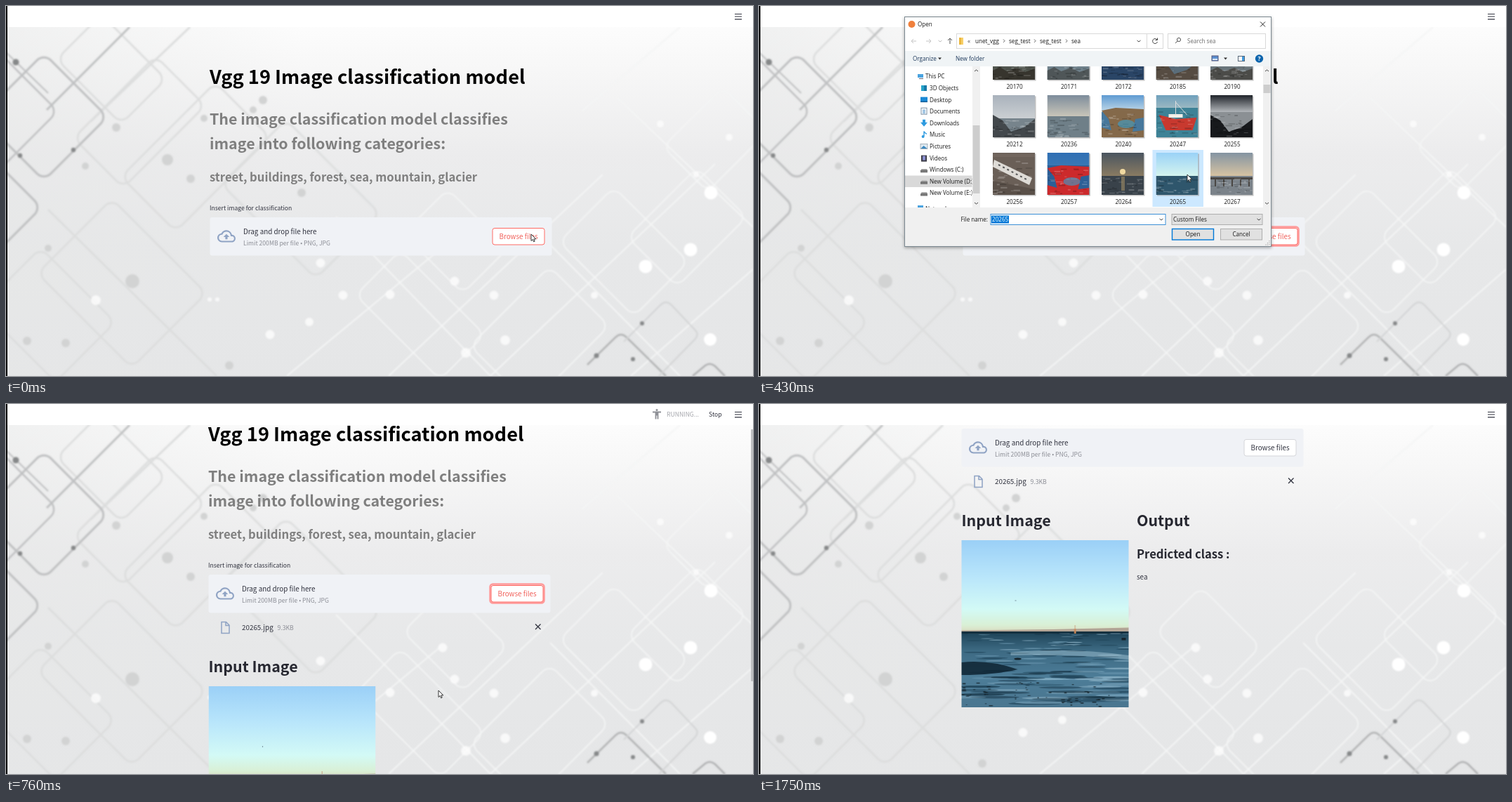
Write an HTML page that moves like this. It is 1064 px wide and 527 px high and loops after 2.15 s.

```html
<!DOCTYPE html>
<html lang="en">
<head>
<meta charset="utf-8">
<title>Image classification demo</title>
<style>
html, body { margin: 0; width: 100%; height: 100%; overflow: hidden; background: #fff; }
svg { display: block; width: 1064px; height: 527px; }
.page { font-family: "Noto Sans CJK JP", "Noto Sans CJK SC", "Noto Sans CJK", "Open Sans", sans-serif; }
.ui { font-family: "Open Sans", "Noto Sans", sans-serif; }
text { white-space: pre; }
</style>
</head>
<body>
<svg id="stage" viewBox="0 0 1064 527" xmlns="http://www.w3.org/2000/svg"></svg>
<script>
const LOOP = 2150;
const INK = '#31333f';

let seed = 7;
const rnd = (a = 0, b = 1) => {
  seed = (seed * 16807) % 2147483647;
  return +(a + (b - a) * seed / 2147483647).toFixed(2);
};
const times = (n, fn) => Array.from({ length: n }, (_, i) => fn(i)).join('');

const rect = (x, y, w, h, fill, extra = '') =>
  `<rect x="${x}" y="${y}" width="${w}" height="${h}" fill="${fill}" ${extra}/>`;
const path = (d, stroke, w = 1, extra = '') =>
  `<path d="${d}" fill="none" stroke="${stroke}" stroke-width="${w}" ${extra}/>`;
const shape = (d, fill, extra = '') => `<path d="${d}" fill="${fill}" ${extra}/>`;
const dot = (x, y, r, fill, extra = '') => `<circle cx="${x}" cy="${y}" r="${r}" fill="${fill}" ${extra}/>`;
const text = (x, y, size, str, fill = '#1a1a1a', extra = '') =>
  `<text x="${x}" y="${y}" font-size="${size}" fill="${fill}" ${extra}>${str}</text>`;
const group = (id, body, extra = '') => `<g id="${id}" ${extra}>${body}</g>`;
const gradient = (id, ...stops) => `<linearGradient id="${id}" x2="0" y2="1">` +
  stops.map(([at, c]) => `<stop offset="${at}" stop-color="${c}"/>`).join('') + '</linearGradient>';
const clip = (id, x, y, w, h) => `<clipPath id="${id}">${rect(x, y, w, h, '#000')}</clipPath>`;
const chevron = (x, y, up, c = '#444') => path(`M${x - 2.5} ${y + up}l2.5 ${-2 * up}l2.5 ${2 * up}`, c);

// ---- backdrop -------------------------------------------------------
const loop = (cx, cy, w, h, c, sw) => rect(cx - w / 2, cy - h / 2, w, h, 'none',
  `rx="14" stroke="${c}" stroke-width="${sw}" transform="rotate(45 ${cx} ${cy})"`);
const line = (x1, y1, x2, y2, c, sw) => path(`M${x1} ${y1}L${x2} ${y2}`, c, sw);
const dots = (list, fill, extra) => list.map(p => dot(...p, fill, extra)).join('');

function backdrop() {
  const dark = '#c0c1c2', faint = '#dcdddd', pale = '#f4f5f5';
  const faintLoops = [[190, 165, 100, 165], [270, 215, 110, 190], [165, 395, 190, 150], [60, 440, 150, 120],
    [420, 275, 190, 130], [150, 90, 130, 90]];
  const paleLoops = [[640, 335, 120, 90], [970, 315, 100, 140], [880, 350, 150, 110], [590, 440, 170, 90],
    [1010, 190, 90, 120], [760, 470, 120, 160]];
  const paleLines = [[545, 527, 850, 240], [690, 527, 1010, 225], [890, 527, 1064, 375], [870, 130, 1064, 315],
    [775, 340, 960, 527], [470, 300, 690, 527], [400, 527, 620, 345], [820, 150, 960, 30]];
  const whiteBig = [[1004, 266, 9.5], [975, 347, 9.5], [911, 371, 9.5], [1003, 475, 9]];
  const whiteSmall = [[622, 347, 6.5], [639, 392, 6.5], [547, 411, 6.5], [480, 412, 6.5], [448, 366, 6.5], [695, 412, 6.5],
    [376, 468, 6.5], [432, 450, 6], [655, 494, 7], [711, 476, 7], [128, 419, 7], [290, 418, 3], [301, 418, 3],
    [838, 412, 5], [1030, 187, 5], [983, 240, 4], [932, 168, 5]];
  const grey = [[180, 392, 10], [230, 219, 8], [157, 173, 6], [263, 246, 6], [366, 134, 6], [282, 160, 5],
    [421, 266, 6], [60, 345, 5], [113, 228, 5], [30, 477, 6], [85, 480, 6], [318, 512, 6], [352, 148, 5]];
  const black = [[14, 80, 4.5], [96, 205, 3.2], [20, 213, 3.2], [841, 498, 3.5], [893, 503, 3], [906, 452, 3]];
  const soft = faintLoops.map(a => loop(...a, faint, 2.5)).join('') +
    line(262, 30, 120, 165, faint, 3) + line(300, 527, 60, 290, faint, 2.5) +
    paleLoops.map(a => loop(...a, pale, 1.8)).join('') +
    paleLines.map(a => line(...a, pale, 2)).join('') +
    loop(54, 158, 128, 128, dark, 3) + loop(-18, 150, 130, 130, dark, 2.5) +
    loop(-40, 287, 128, 128, dark, 3) + line(176, 30, 58, 148, dark, 3) + line(0, 66, 60, 124, dark, 2) +
    path('M828 511L868 472Q876 464 884 472L940 527', '#b4b5b6', 2.5) +
    path('M880 478L932 426Q940 418 948 426L982 462Q988 468 980 476L930 527', '#d3d4d5', 2) +
    path('M978 527L996 512Q1003 507 1010 513L1024 527', '#b0b1b2', 2.5) +
    dots(grey, '#d2d3d3') + dots(black, '#868889') +
    dots(whiteSmall, '#fbfbfb', 'opacity=".85"') + dots(whiteBig, '#fff');
  return rect(0, 0, 1064, 527, 'url(#wall)') + rect(0, 30, 420, 497, 'url(#side)') +
    `<g filter="url(#soft)">${soft}</g>`;
}

// ---- photo shown on the page ----------------------------------------
function photo(x, y, s) {
  const wave = () => {
    const d = Math.pow(rnd(), 1.3), cy = 133 + d * 101, w = 8 + d * 30;
    const cx = rnd(0, 238), lit = rnd() < .2 + cx / 500;
    const c = lit ? ['#9fc3d6', '#7fabc4'][Math.round(rnd())] : ['#0e2838', '#1d4156'][Math.round(rnd())];
    return `<ellipse cx="${cx}" cy="${cy}" rx="${w}" ry="${.6 + d * 1.3}" fill="${c}" opacity="${rnd(.3, .65)}"/>`;
  };
  const speck = () => rect(rnd(0, 210), rnd(202, 236), rnd(1, 6), rnd(.8, 2), '#15242c', 'opacity=".8"');
  return `<svg x="${x}" y="${y}" width="${s}" height="${s}" viewBox="0 0 238 238">` +
    rect(0, 0, 238, 131, 'url(#dawn)') + shape('M0 128.500L130 127L238 124.500V131H0z', '#b3a596') +
    rect(0, 130, 238, 108, 'url(#water)') + rect(0, 130, 238, 3, '#14303f') +
    times(130, wave) +
    shape('M0 174Q40 170 80 184Q46 192 0 192z', '#0a1e2c', 'opacity=".8"') +
    shape('M70 160Q150 152 238 164V170Q160 162 70 164z', '#a9cad9', 'opacity=".45"') +
    times(60, speck) +
    `<ellipse cx="80" cy="169" rx="5" ry="1.500" fill="#15242c"/>` + rect(228, 139, 6, 3.5, '#15242c') +
    rect(160.5, 126, 2.5, 7, '#d08a58') + rect(161.2, 121, 1, 6, '#c9a183') + dot(77, 86, .7, '#567') + '</svg>';
}

// ---- thumbnails: name, sky top, sky bottom, sea, land, horizon, kind --
const FIRST = `20072 2f6cb4 b4d2ec 2d6692 5b4935 .55 spray
20076 7b8692 6d6a69 6e7c88 584c42 .1 cliff
20077 b3bfcc d5d9da 7890a0 6b6056 .55 tower
20081 2747b8 97b8f2 2a4c8e 1b2a4b .68 front
20099 8ba0b6 e8bf80 8b8276 4a4239 .45 front
20106 a5a8bd efdcb8 8f887f 6b655e .55 none
20112 3f98e0 bfe0f5 2b78b2 857558 .22 bay
20114 6a8096 e0d6c0 4b6f86 5a7992 .5 isle
20115 98a9ba cfd8de 526c7a 75675b .38 sides
20124 244c80 5f88b4 2a5488 1c3a66 .5 none
20139 4a9edb cbe6f4 3c82a8 5f8550 .42 isle
20142 58a8dc d8ecf4 3d88ae 587a48 .4 isle
20151 6d747a a8a9a8 3a3f45 3f3d3c .2 cliff
20157 466c90 e5a95c 57483c 3a3029 .42 none
20161 7c9bb4 c8c2b2 8f8a78 c2b193 .2 cliff`;
const LATER = `20170 8da3b5 d8cbb2 51564f 37352e .5 front
20171 9db0c0 c9d0d4 70828c 4f5658 .5 front
20172 3f6fa8 e2b680 2a4566 1d2a3c .6 none
20185 7f97ac c8cdd0 5a6d7a 564c42 .5 sides
20190 8b98a2 d2d2cd 69757b 4b4b48 .5 front
20212 a9b2bc ccd0d3 77848c 43484c .55 sides
20236 7d8c9b cbc7ba 6f7f88 585f60 .5 none
20240 5f9bd2 c6dcea 47789c 84694a .4 bay
20247 6fa0bc 9db9c2 3e8296 c8392f .3 boat
20255 20242a b8bcc0 8b9094 17191c .4 sides
20256 6d625b 75685f 6a5f57 5a5049 .1 sign
20257 2f6fb4 3a78b4 2c5f96 cc2a2c .3 bay
20264 4a5560 8b7c62 39424a 2c2f30 .55 sun
20265 9ad2f7 d6f5ee 2f566c 5f8ba0 .55 none
20267 8494a2 d9c4a2 7b838a 4a4744 .55 pier`;

const LAND = {
  none: '', sun: '', pier: 'M0 35h60v3H0zM6 36h2v12H6zM18 36h2v12h-2zM30 36h2v12h-2zM42 36h2v12h-2zM54 36h2v12h-2z',
  front: 'M0 47L10 42L20 48L34 43L46 49L60 44V60H0z', spray: 'M0 42L16 45L30 40L60 43V60H0z',
  cliff: 'M14 0L60 0V60H4L10 38L2 24z', isle: 'M0 14Q14 13 26 22L50 26L60 29H0z',
  bay: 'M0 22L20 18L60 20V32L48 34L44 52L60 50V60H0V46L14 50L10 34z',
  tower: 'M0 36L14 33L24 44L22 60H0z', sides: 'M0 28L14 36L26 52L44 46L60 34V60H0z',
  boat: 'M4 28L28 34L58 32L52 50H14z', sign: 'M0 40L60 52V60H0z'
};
const EXTRA = {
  spray: times(12, i => dot(22 + 3 * i, 33 - (i * 7) % 17, 4.5, '#f3f7fa', 'opacity=".8"')),
  tower: rect(6, 12, 6, 24, '#c33b35') + rect(6, 18, 6, 5, '#eee') + rect(6, 28, 6, 4, '#eee') + rect(7, 8, 4, 4, '#8b3030'),
  bay: `<ellipse cx="35" cy="41" rx="12" ry="6" fill="#38a0cf" opacity=".6"/>`,
  boat: rect(18, 27, 20, 5, '#f2efe8') + path('M28 8V28M28 10L44 28', '#ddd', 1),
  sign: shape('M2 10L56 36L52 46L0 20z', '#dedbd6') + path('M8 17L48 38', '#555', 2, 'stroke-dasharray="3 4"'),
  sun: dot(30, 27, 4, '#f0d9a0') + rect(28, 34, 5, 20, '#b59b6a', 'opacity=".5"')
};

let defs = '';
function thumb(spec, i, top) {
  const [name, sky, low, sea, land, h, kind] = spec.split(' ');
  const x = 333 + 77.5 * (i % 5), y = top + 82 * Math.floor(i / 5), hy = 60 * h, id = 'sky' + name;
  defs += gradient(id, [0, '#' + sky], [1, '#' + low]);
  const dab = () => rect(rnd(-4, 54), rnd(hy + 2, 58), rnd(2, 10), rnd(.8, 2.2), rnd() > .5 ? '#fff' : '#000', 'opacity=".2"');
  return rect(x + 1.5, y + 1.5, 60, 60, '#999', 'opacity=".6"') +
    `<svg x="${x}" y="${y}" width="60" height="60" viewBox="0 0 60 60">` +
    rect(0, 0, 60, hy + 1, `url(#${id})`) + rect(0, hy, 60, 60 - hy, '#' + sea) +
    shape(LAND[kind], '#' + land) + times(34, dab) + (EXTRA[kind] || '') + '</svg>' +
    text(x + 31, y + 73, 8.1, name, '#1a1a1a', 'text-anchor="middle"');
}
const grid = (list, top) => list.split('\n').map((s, i) => thumb(s, i, top)).join('');

// ---- file dialog ----------------------------------------------------
const PLACES = ['3D Objects', 'Desktop', 'Documents', 'Downloads', 'Music', 'Pictures', 'Videos',
  'Windows (C:)', 'New Volume (D:)', 'New Volume (E:)'];
function placeIcon(i, y) {
  const blue = '#2f9be0';
  return [
    rect(231, y - 4, 8, 8, '#27a3c9') + rect(235, y - 4, 4, 8, '#1779a8'),
    rect(230, y - 4, 10, 7, '#1b8ad6') + rect(230, y + 2, 10, 1.5, '#0e5c97'),
    rect(231, y - 5, 8, 9, '#fff', 'stroke="#7a8fa3"') + path(`M233 ${y - 2}h4M233 ${y}h4M233 ${y + 2}h4`, '#4a90c8'),
    shape(`M233 ${y - 5}h4v4h3l-5 6l-5 -6h3z`, blue),
    path(`M235 ${y + 2}v-7q1 3 4 4`, blue, 1.4) + dot(233.6, y + 2.6, 2, blue),
    rect(230, y - 3.5, 10, 7, '#dfe9f0', 'stroke="#8795a0" stroke-width=".7"') + shape(`M230.500 ${y + 3}l4-4l5 4z`, '#3a88c0'),
    rect(231, y - 4, 8, 9, '#3c3c48') + rect(233, y - 3, 4, 6, '#8a8fd0')
  ][i] || shape(`M230 ${y + 1}l2-2h7l1 2v3h-10z`, '#777') + rect(231, y - 1, 8, 1, '#bbb');
}

function dialog() {
  const crumbs = [[308, 'unet_vgg'], [356, 'seg_test'], [400, 'seg_test'], [445, 'sea']];
  const nav = rect(208, 241.5, 96, 16.5, '#d9d9d9') +
    rect(226, 97, 8, 5, '#4aa3df') + rect(228, 103, 6, 1, '#667') + text(237, 103, 8.1, 'This PC') +
    PLACES.map((p, i) => placeIcon(i, 117 + 16.6 * i) + text(243, 120 + 16.6 * i, 8.1, p)).join('') +
    rect(226, 284, 8, 5, '#4aa3df') + text(237, 291.5, 8.1, 'Network');
  return rect(207.5, 15.5, 522, 327, '#fff', 'stroke="#7d8a92" filter="url(#shadow)"') +
    group('dlgIcon', dot(217.5, 26, 5, '#f0803c')) +
    group('dlgTitle', text(0, 29, 8.1, 'Open')) +
    path('M714 22.500l7 7m0-7l-7 7', '#222') +
    path('M224 50h-7m3-3l-3 3l3 3M238 50h7m-3-3l3 3l-3 3', '#c4c4c4') +
    chevron(258, 50, -1, '#bbb') + path('M272 54v-8m-3 3l3-3l3 3', '#555', 1) +
    rect(281.5, 39.5, 294, 21, '#fff', 'stroke="#d9d9d9"') + path('M552.500 40v20', '#d9d9d9') +
    rect(285, 45, 6, 10, '#f7d06a') + rect(285, 45, 3, 10, '#eab63e') +
    text(297, 52.5, 8.1, '«', '#555') +
    crumbs.map(([x, s]) => text(x, 53, 8.1, s)).join('') +
    [349, 393, 438].map(x => path(`M${x - 1} 47.500l2 2.200l-2 2.200`, '#666')).join('') +
    chevron(541, 50, -1) + path('M567 48a3.500 3.500 0 1 0 .5 3M567.500 45.500v3h-3', '#444') +
    rect(208, 64, 521, 22, '#f0f4f6') +
    group('dlgLate',
      rect(582.5, 39.5, 139, 21, '#fff', 'stroke="#d9d9d9"') +
      path('M593 53l3-3', '#555') + `<circle cx="598" cy="48" r="2.6" fill="none" stroke="#555"/>` +
      text(610, 53, 8.1, 'Search sea', '#6d6d6d') +
      text(219, 78, 8.1, 'Organize', '#1e395b') + shape('M255 73.500h5l-2.500 3z', '#333') +
      text(280, 78, 8.1, 'New folder', '#1e395b') +
      rect(645, 71, 9, 7, '#5a8fd0', 'stroke="#557"') + rect(646, 75, 7, 2, '#dce8f4') + shape('M662 73.500h5l-2.500 3z', '#333')) +
    rect(682.5, 71.5, 9, 7, '#fff', 'stroke="#567"') + rect(688, 72, 3, 6, '#3f9be0') +
    dot(712.5, 75, 5.7, '#0a64ad') + text(712.5, 78, 8.5, '?', '#fff', 'text-anchor="middle" font-weight="700"') +
    `<g clip-path="url(#navClip)">${nav}</g>` +
    rect(304, 86, 11, 201, '#f0f0f0') + rect(304.5, 170, 10, 97, '#cdcdcd') + chevron(309.5, 92, 1) + chevron(309.5, 281, -1) +
    `<g clip-path="url(#listClip)">` +
      group('listTop', group('hover', rect(560.5, 173, 72.5, 81, '#e5f3ff')) + grid(FIRST, 94)) +
      group('listLow', `<rect id="pick" x="560.5" y="205" width="72.5" height="81"/>` + grid(LATER, 45)) + '</g>' +
    rect(718, 86, 11, 201, '#f0f0f0') + `<rect id="thumbBar" x="718.5" width="10" height="12" fill="#cdcdcd"/>` +
    chevron(723.5, 92, 1) + chevron(723.5, 281, -1) +
    rect(208, 287, 521, 55, '#f0f0f0') +
    text(326, 307, 8.1, 'File name:', '#1a1a1a', 'text-anchor="end"') +
    rect(330, 296.5, 249, 15, '#fff', 'stroke="#3c8fd6"') + chevron(573, 304, -1) +
    group('caret', path('M332.500 299v10', '#222', .8)) +
    group('chosen', rect(331, 298.5, 25, 11, '#0078d7') + text(332, 307, 8.1, '20265', '#fff')) +
    rect(588, 296.5, 129, 15, '#e1e1e1', 'stroke="#adadad"') + text(590, 307, 8.1, 'Custom Files') + chevron(712, 304, -1) +
    `<rect id="openBtn" x="588.5" y="317.500" width="59" height="15.500" stroke="#0078d7" stroke-width="1.4"/>` +
    text(618, 328, 8.1, 'Open', '#1a1a1a', 'text-anchor="middle"') +
    rect(657.5, 317.5, 59, 15.5, '#e1e1e1', 'stroke="#adadad"') +
    text(687, 328, 8.1, 'Cancel', '#1a1a1a', 'text-anchor="middle"') +
    path('M727 334v7M724.500 337v4M722 339.500v1.500', '#aaa', 1.2, 'stroke-dasharray="1.2 1.3"');
}

// ---- page -----------------------------------------------------------
const bold = 'font-weight="700"';
const CLOUD = 'M19.35 10.04A7.49 7.49 0 0 0 12 4C9.11 4 6.6 5.64 5.35 8.04A6 6 0 0 0 0 14c0 3.310 2.690 6 6 6h13' +
  'c2.760 0 5-2.240 5-5 0-2.640-2.050-4.780-4.650-4.960zM19 18H6a4 4 0 0 1-.44-7.970l1.070-.11.5-.95A5.470 5.470 0 0 1 17.390 10.430' +
  'l.3 1.500 1.530.11A2.980 2.980 0 0 1 19 18zM8 13h2.550v3h2.900v-3H16l-4-4z';
function page() {
  return text(290, 111, 27.2, 'Vgg 19 Image classification model', '#000', bold) +
    text(290, 169, 21.4, 'The image classification model classifies', '#7f7f7f', bold) +
    text(290, 204, 21.4, 'image into following categories:', '#7f7f7f', bold) +
    text(290, 250, 16.65, 'street, buildings, forest, sea, mountain, glacier', '#7f7f7f', bold) +
    text(290, 290.7, 8.62, 'Insert image for classification', INK) +
    rect(290.5, 301, 487, 54.5, '#f0f2f6', 'rx="3"') +
    shape(CLOUD, '#8fa3c4', 'transform="translate(301 315) scale(1.08)"') +
    text(338, 324.6, 9.85, 'Drag and drop file here', INK) +
    text(338, 341, 8.62, 'Limit 200MB per file • PNG, JPG', '#8b8d95') +
    `<rect id="ring" x="691.5" y="314.500" width="77" height="27" rx="4" fill="none" stroke="#ff9a9a" stroke-width="2.500"/>` +
    `<rect id="browse" x="693" y="316.500" width="74" height="23.500" rx="3"/>` +
    text(730, 331.6, 9.85, 'Browse files', INK, 'id="browseText" text-anchor="middle"') +
    group('upload',
      path('M309 368.500h6.500l4.500 4.500v11.500h-11zM315 368.500v5h5', '#8fa3c4', 1.5) +
      text(338, 379.6, 9.85, '20265.jpg', INK) + text(388.5, 379.6, 8.62, '9.3KB', '#8b8d95') +
      path('M756 371.500l7.500 7.500m0-7.500l-7.500 7.500', INK, 1.3) +
      text(290.5, 440, 21.4, 'Input Image', '#262730', bold) + photo(290.5, 460, 238)) +
    group('output',
      text(540, 440, 21.4, 'Output', '#262730', bold) +
      text(540, 486, 16.65, 'Predicted class :', '#262730', bold) +
      text(540, 516.2, 9.85, 'sea', INK));
}

function header() {
  const man = '#8e9096';
  return rect(0, 0, 1064, 30, '#fff') +
    group('status',
      group('stand', dot(927, 8.6, 1.5, man) + path('M921 11.500h12M925.500 12v9.500M928.500 12v9.500M927 11.500v5', man, 1.8)) +
      group('run', dot(929, 8.6, 1.5, man) +
        path('M922 14v-2.300l4.500-1l-1.500 5.300l3 2v4M925 16l-1.200 3l-3.600-.6M927 11l2 2.500l3.200.5', man, 1.6)) +
      text(941, 17.7, 8.62, 'RUNNING...', '#a3a4aa') + text(1001, 17.7, 8.62, 'Stop', INK)) +
    path('M1038 11.500h10M1038 15h10M1038 18.800h10', INK, 1.2);
}

const stage = document.getElementById('stage');
const body = backdrop() + group('page', page(), 'class="page"') + group('header', header(), 'class="page"') +
  rect(1061, 0, 3, 359, '#bfc0c2', 'id="scrollbar" rx="1"') + rect(0, 0, 2, 527, '#000') +
  group('dialog', dialog(), 'class="ui"') +
  group('cursor', shape('M0 0v9.500l2.200-2l1.500 3.300l1.500-.7l-1.400-3.200h3z', '#fff', 'stroke="#222" stroke-width=".9"'));
stage.innerHTML = '<defs>' + defs +
  gradient('wall', [0, '#fff'], [.15, '#f8f8f8'], [.4, '#ececed'], [.65, '#e7e8e9'], [1, '#e5e6e7']) +
  `<linearGradient id="side"><stop stop-color="#e6e7e7" stop-opacity=".55"/><stop offset="1" stop-color="#e6e7e7" stop-opacity="0"/></linearGradient>` +
  gradient('dawn', [0, '#9bd0f7'], [.4, '#b9e6fb'], [.75, '#d3faf6'], [.92, '#d9f0d6'], [1, '#dcdcc0']) +
  gradient('water', [0, '#1d4256'], [.25, '#3d6a83'], [.6, '#4d7d98'], [1, '#4a7690']) +
  clip('navClip', 208, 86, 95.5, 201) + clip('listClip', 316, 86, 402, 201) +
  '<filter id="soft" x="0" y="0" width="100%" height="100%"><feGaussianBlur stdDeviation=".8"/></filter>' +
  '<filter id="shadow" x="-5%" y="-5%" width="110%" height="112%"><feDropShadow dx="0" dy="1.500" stdDeviation="2" flood-opacity=".35"/></filter>' +
  '</defs>' + body;

// ---- timeline: each entry holds until the next ------------------------
const HOT = ['#fff', '#ff6a64', '#f0605a'];
const PRESSED = ['#ff4b4b', '#ff4b4b', '#fff'];
const CALM = ['#fff', '#d5d6da', INK];
const FADE = .66;
const steps = [
  { at: 0, cursor: [748, 325] },
  { at: 60, cursor: [748, 325], button: PRESSED },
  { at: 150, cursor: [748, 325], dialog: FADE, bare: true },
  { at: 240, cursor: [700, 268], dialog: 1 },
  { at: 330, cursor: [610, 203], dialog: 1, hover: true },
  { at: 430, cursor: [610, 240], dialog: 1, low: true, ring: true },
  { at: 520, cursor: [643, 325], dialog: FADE, low: true, closing: true, ring: true },
  { at: 600, cursor: [643, 325], ring: true, status: 'stand' },
  { at: 680, cursor: [616, 408], ring: true, status: 'run', upload: true, scroll: 0 },
  { at: 760, cursor: [616, 408], ring: true, status: 'stand', upload: true, scroll: 58 },
  { at: 1470, cursor: [616, 408], ring: true, status: 'run', upload: true, scroll: 147 },
  { at: 1560, cursor: [616, 408], ring: true, status: 'stand', upload: true, scroll: 236 },
  { at: 1650, cursor: [616, 408], ring: true, status: 'run', upload: true, scroll: 266 },
  { at: 1750, button: CALM, upload: true, scroll: 266, output: true }
];

const el = id => document.getElementById(id);
const set = (id, attrs) => { for (const k in attrs) el(id).setAttribute(k, attrs[k]); };
const show = (id, on) => set(id, { display: on ? 'inline' : 'none' });

function render(t) {
  const s = steps.filter(step => step.at <= t).pop();
  const [fill, stroke, ink] = s.button || HOT;
  const scroll = s.scroll || 0, k = s.dialog < 1 ? .981 : 1;
  set('page', { transform: `translate(${s.upload ? -2 : 0} ${-scroll})` });
  set('browse', { fill, stroke });
  set('browseText', { fill: ink });
  set('scrollbar', { y: Math.round(scroll * .664 - 2.5) });
  set('dialog', { opacity: s.dialog || 0, transform: `translate(468 178.5) scale(${k}) translate(-468 -178.5)` });
  set('dlgTitle', { transform: `translate(${s.closing ? 212 : 226} 0)` });
  set('pick', { fill: s.closing ? '#d9d9d9' : '#cce8ff' });
  set('thumbBar', { y: s.low ? 112 : 97 });
  set('openBtn', { fill: s.closing ? '#cfe6f8' : '#e1e1e1' });
  if (s.cursor) set('cursor', { transform: `translate(${s.cursor})` });
  const visible = {
    ring: s.ring, upload: s.upload, output: s.output, status: s.status,
    stand: s.status === 'stand', run: s.status === 'run', scrollbar: s.upload && !s.output,
    dialog: s.dialog, dlgIcon: !s.closing, dlgLate: !s.bare, hover: s.hover,
    listTop: !s.low, listLow: s.low, chosen: s.low, caret: s.bare, cursor: s.cursor
  };
  for (const id in visible) show(id, visible[id]);
}

const start = performance.now();
function tick() {
  render((performance.now() - start) % LOOP);
  requestAnimationFrame(tick);
}
tick();
</script>
</body>
</html>
```
